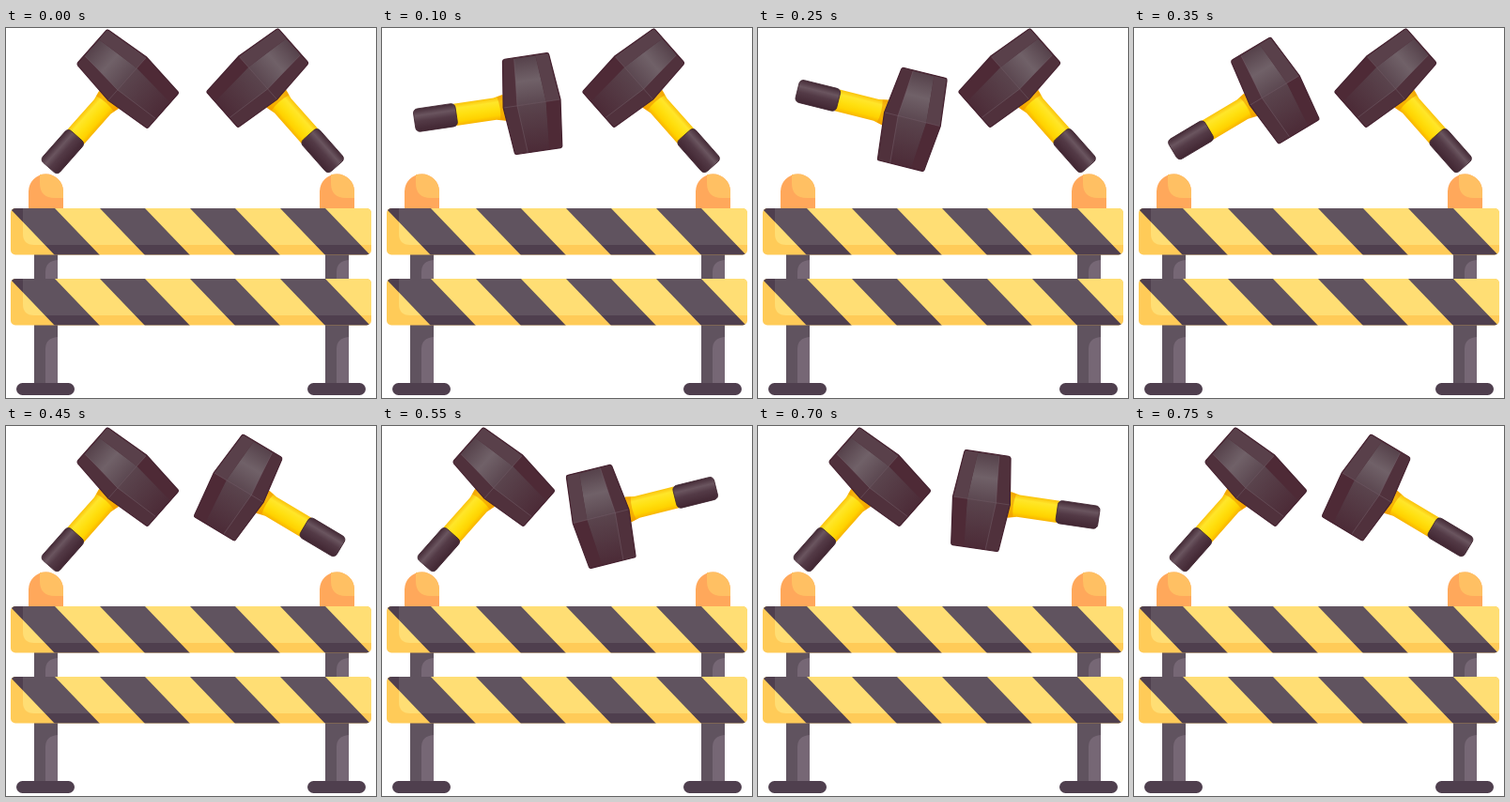
These frames come from a looping animation (394 px wide and 394 px high, 0.8 s). An HTML page:

```html
<!DOCTYPE html>
<html lang="en">
<head>
<meta charset="utf-8">
<title>Hammers over a barrier</title>
<style>
  html, body { margin: 0; width: 100%; height: 100%; overflow: hidden; background: #fff; }
  svg { display: block; width: 100%; height: 100%; }
</style>
</head>
<body>
<svg viewBox="0 0 394 394">
  <defs>
    <linearGradient id="yellow" x2="0" y2="1">
      <stop stop-color="#f8b400"/>
      <stop offset=".25" stop-color="#ffe62a"/>
      <stop offset=".5" stop-color="#ffe010"/>
      <stop offset=".75" stop-color="#ffd200"/>
      <stop offset="1" stop-color="#f5a300"/>
    </linearGradient>
    <linearGradient id="grip" x2="0" y2="1">
      <stop stop-color="#452b37"/>
      <stop offset=".3" stop-color="#6a555f"/>
      <stop offset=".55" stop-color="#533a46"/>
      <stop offset="1" stop-color="#412632"/>
    </linearGradient>
    <linearGradient id="shine" x2="0" y2="1">
      <stop stop-color="#56424b"/>
      <stop offset=".5" stop-color="#706168"/>
      <stop offset="1" stop-color="#5c4851"/>
    </linearGradient>
    <linearGradient id="shade" x2="0" y2="1">
      <stop stop-color="#5a444d"/>
      <stop offset="1" stop-color="#4c2b37"/>
    </linearGradient>
    <clipPath id="plank"><rect x="5" width="384" height="49.500" rx="5"/></clipPath>
    <clipPath id="lit"><path d="M18 0H389V39H30Q18 39 18 27Z"/></clipPath>
    <path id="head" d="M28-71H73Q75-71 75.300-69L80.500-20L75 29.500Q74.800 31 73 31H26Q24 31 24 29L19-20L25.500-69Q26-71 28-71Z"/>

    <!-- Lies along the x axis and turns about the origin -->
    <g id="hammer">
      <path d="M-33-32H10L20-34V-6L10-8.500H-33Z" fill="url(#yellow)"/>
      <path d="M14-32.500L22-34V-6L14-8Q17-20 14-32.500Z" fill="#ee9600" opacity=".6"/>
      <rect x="-76.500" y="-32.500" width="45" height="24.500" rx="4.500" fill="url(#grip)" stroke="#3f2430" stroke-width=".8"/>
      <use href="#head" fill="#50313c"/>
      <path d="M38-70H61L65-20H34Z" fill="url(#shine)"/>
      <path d="M34-20H65L61 31H38Z" fill="url(#shade)"/>
      <path d="M61-71H75L80-20H65Z" fill="#59404a"/>
      <path d="M65-20H80L74 31H61Z" fill="#4e2a36"/>
      <path d="M19-20H80M38-70L34-20L38 31" fill="none" stroke="#7a6670" stroke-width=".8" opacity=".5"/>
      <use href="#head" fill="none" stroke="#45212f" stroke-width="1.200"/>
    </g>

    <path id="stripes"/>
    <g id="plankArt" clip-path="url(#plank)">
      <rect width="394" height="50" fill="#ffcb58"/>
      <use href="#stripes" fill="#4f3f4e"/>
      <g clip-path="url(#lit)">
        <rect width="394" height="50" fill="#ffde74"/>
        <use href="#stripes" fill="#60535f"/>
      </g>
    </g>

    <g id="post">
      <path d="M24 192V174a18.500 18.500 0 0 1 37 0V192Z" fill="#ffa85b"/>
      <path d="M36 156Q39 155.500 42.500 155.500A18.500 18.500 0 0 1 61 174V181H52Q36 181 36 165Z" fill="#ffc063"/>
      <path d="M30 240H55V380H30Z" fill="#766775"/>
      <path d="M30 240H55V247Q42 248 42 260V270H30ZM30 316H55V329Q42 330 42 342V380H30Z" fill="#60535f"/>
      <rect x="11" y="378" width="62" height="13" rx="6.500" fill="#4f3f4e"/>
    </g>
  </defs>

  <rect width="394" height="394" fill="#fff"/>
  <use href="#post"/>
  <use href="#post" x="310"/>
  <use href="#plankArt" y="192"/>
  <use href="#plankArt" y="267"/>
  <g transform="translate(111.300 104.600)"><use id="left" href="#hammer"/></g>
  <g transform="translate(286.200 103.600) scale(-1 1)"><use id="right" href="#hammer"/></g>
</svg>
<script>
  const STEP = 50, STEPS = 16;
  // Angle and pivot shift, from rest to the lowest point
  const POSES = [[-48.5, 0, 0], [-30.8, 6, 4.5], [-8.4, 2, 3], [14, 0, 0], [36.4, -1, -3]];
  const byId = id => document.getElementById(id);

  byId('stripes').setAttribute('d',
    [0, 1, 2, 3].map(i => `M${4 + 96 * i} 0h48l48 50h-48Z`).join(''));

  // Swings down for four steps and back for four, then rests
  const swing = (id, step) => {
    const [angle, x, y] = POSES[Math.max(0, Math.min(step, 8 - step))];
    byId(id).setAttribute('transform', `translate(${x} ${y}) rotate(${angle})`);
  };

  const start = performance.now();
  function draw() {
    const step = Math.floor((performance.now() - start) / STEP) % STEPS;
    swing('left', step);
    swing('right', step - 8);
    requestAnimationFrame(draw);
  }
  draw();
</script>
</body>
</html>
```
